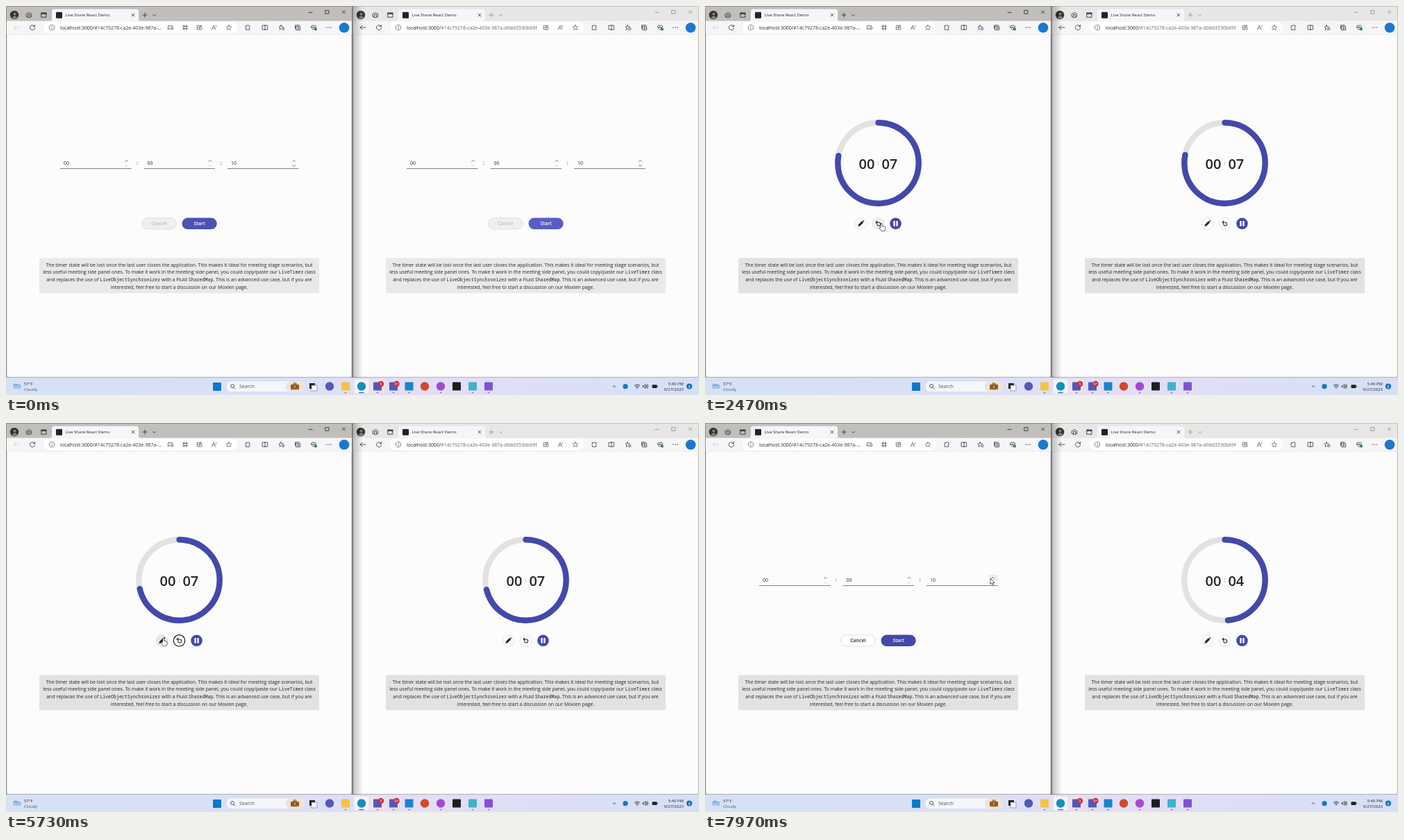
An HTML page that plays this animation: 998 px wide and 561 px high, repeating every 8000 ms.

```html
<!DOCTYPE html>
<html lang="en">
<head>
<meta charset="utf-8">
<title>Shared timer</title>
<style>
  html, body { margin: 0; width: 100%; height: 100%; overflow: hidden; }
  svg { display: block; width: 100vw; height: 100vh; }
  text { font: 6.95px "Open Sans", "Noto Sans", sans-serif; fill: #242424; white-space: pre; }
  .mono { font: 6.6px "Noto Sans Mono", "DejaVu Sans Mono", monospace; }
  .mid { text-anchor: middle; }
  .end { text-anchor: end; }
  .small { font-size: 6px; }
  .semi { font-weight: 600; }
  .digits { font-size: 20px; font-weight: 600; }
  .icon { fill: none; stroke-width: .8; stroke-linecap: round; stroke-linejoin: round; }
</style>
</head>
<body>
<svg id="stage" viewBox="0 0 998 561" preserveAspectRatio="none"></svg>
<script>
const LOOP = 8000;
const BRAND = '#4448aa';
const PANE = 499;
const stage = document.getElementById('stage');

const ICONS = {
  back: 'M4 0H-4M-1 -3L-4 0L-1 3',
  reload: 'M3.2 -1.6A3.6 3.6 0 1 0 3.6 .6M3.5 -3.6V-1.4H1.3',
  info: 'M-3.7 0a3.7 3.7 0 1 0 7.4 0a3.7 3.7 0 1 0 -7.4 0M0 -.4V1.8M0 -1.8V-1.7',
  device: 'M-3.5 1.8V-2.5H3M-4 2H0M1.2 -.5H3.6V2.4H1.2Z',
  shot: 'M-3.5 -1.7H3.5M-3.5 1.7H3.5M-1.8 -3.5V3.5M1.8 -3.5V3.5',
  apps: 'M-3.3 -3H-.3V3H-3.3ZM-3.3 0H3V3H-.3M1.6 -3.6V-.8M.2 -2.2H3',
  read: 'M-3.7 3L-1 -3.2L1.7 3M-2.8 1H.8M2.2 -3.4Q3.8 -2.6 2.4 -.8',
  star: 'M0 -3.7L1.1 -1.3L3.7 -1L1.8 .8L2.3 3.4L0 2.1L-2.3 3.4L-1.8 .8L-3.7 -1L-1.1 -1.3Z',
  puzzle: 'M-2.6 -2.6H-.7A1.2 1.2 0 0 1 1.6 -2.6H3V-.9A1.2 1.2 0 0 0 3 1.4V3.2H-2.6V1.2A1.2 1.2 0 0 1 -2.6 -1Z',
  split: 'M-3.6 -3H3.6V3H-3.6ZM0 -3.7V3.7',
  favs: 'M-1 -3.4L0 -1.2L2.6 -.9M-1 -3.4L-2 -1.2L-4 -.9L-2.4 .8L-2.8 3.2L-1 2M.4 1H4M.4 3H4',
  stack: 'M-2 -1.7H3.6V3.5H-2ZM-3.5 1.5V-3.3H2M.8 -.4V2.2M-.5 .9H2.1',
  heart: 'M-3.5 -.8A2 2 0 0 1 0 -2.4A2 2 0 0 1 3.5 -.8Q2.6 1.6 0 3.4Q-2.8 1.4 -3.5 -.8ZM-2.5 0H-.8L0 -1.2L.8 .8L2.4 0',
  spaces: 'M-3.6 -1.6L0 -3.6L3.6 -1.6V2.4L0 3.8L-3.6 2.4ZM-1.5 -.6H1.7V3M-1.5 -.6V3',
  tabs: 'M-3.4 -3.2H3.4V3.2H-3.4ZM-3.4 -1.6H3.4M-3.4 -2.4H3.4',
  plus: 'M-3 0H3M0 -3V3',
  cross: 'M-2 -2L2 2M2 -2L-2 2',
  down: 'M-2 -1L0 1L2 -1',
  up: 'M-2 1L0 -1L2 1',
  minimise: 'M-2.6 0H2.6',
  maximise: 'M-2.4 -2.4H2.4V2.4H-2.4Z',
  lens: 'M-3 -.7a2.5 2.5 0 1 0 5 0a2.5 2.5 0 1 0 -5 0M1.2 1.2L3.4 3.4',
  undo: 'M-1.8 -3.7L-3.6 -1.8L-1.6 -.1M-3.4 -1.8H.5A2.5 2.5 0 1 1 -2 1',
  wifi: 'M-3.7 -1.2Q0 -4.2 3.7 -1.2M-2.4 .3Q0 -1.6 2.4 .3M-1.1 1.7Q0 .8 1.1 1.7M0 2.8V2.9',
  sound: 'M-3.5 -1H-2L0 -3V3L-2 1H-3.5ZM1.4 -1.5Q2.4 0 1.4 1.5M2.8 -2.7Q4.4 0 2.8 2.7',
};

const icon = (name, x, y, color = '#303030', extra = '') =>
  `<path class="icon" d="${ICONS[name]}" transform="translate(${x} ${y})" stroke="${color}" ${extra}/>`;
const rect = (x, y, w, h, fill, r = 0, extra = '') =>
  `<rect x="${x}" y="${y}" width="${w}" height="${h}" rx="${r}" fill="${fill}" ${extra}/>`;
const disc = (x, y, r, fill, extra = '') => `<circle cx="${x}" cy="${y}" r="${r}" fill="${fill}" ${extra}/>`;
const text = (x, y, str, cls = '', extra = '') => `<text x="${x}" y="${y}" class="${cls}" ${extra}>${str}</text>`;
const mono = str => `<tspan class="mono">${str}</tspan>`;

const NOTE = [
  'The timer state will be lost once the last user closes the application. This makes it ideal for meeting stage scenarios, but',
  `less useful meeting side panel ones. To make it work in the meeting side panel, you could copy/paste our ${mono('LiveTimer')} class`,
  `and replaces the use of ${mono('LiveObjectSynchronizer')} with a Fluid ${mono('SharedMap')}. This is an advanced use case, but if you are`,
  'interested, feel free to start a discussion on our Moxlen page.',
];

function chrome(active) {
  const ink = active ? '#252525' : '#8c8a8c';
  const url = active ? '#14c79278-ca2e-403e-987a-...' : '#14c79278-ca2e-403e-987a-d0dd3530b69f';
  const tools = { apps: 279, read: 300, star: 321, puzzle: 348, split: 373, favs: 397, stack: 420, heart: 443 };
  return rect(0, 0, PANE, 536, active ? '#c1bebb' : '#e8e6e6')
    + rect(1, 21.5, 497, 20, '#f6f5f8')
    + `<path d="M63 22Q66 22 66 19V8Q66 4.500 69.500 4.500H187.500Q191 4.500 191 8V19Q191 22 194 22Z" fill="#f6f5f9"/>`
    + disc(12, 13, 6.2, '#35322f') + disc(12.5, 11.5, 2, '#8b8178')
    + `<path d="M8.500 17.300Q12.500 11.500 16.200 16.700Q12.500 20.500 8.500 17.300Z" fill="#8b8178"/>`
    + icon('spaces', 33, 13) + icon('tabs', 54.5, 13, '#222')
    + rect(72, 8.7, 9, 9, '#20232a', 1)
    + text(85.5, 15.3, 'Live Share React Demo', 'small')
    + icon('cross', 183, 13) + icon('plus', 200, 13, ink) + icon('down', 213.5, 13.5, ink)
    + icon('minimise', 438.5, 9.3, ink) + icon('maximise', 462.5, 8.8, ink) + icon('cross', 486.5, 8.8, ink)
    + icon('back', 15, 31, active ? '#cccbd0' : '#303030') + icon('reload', 38, 31)
    + rect(54, 23, 279, 16, '#fff', 8) + icon('info', 66, 31, '#666')
    + text(78, 33.6, `localhost:3000/<tspan fill="${active ? '#333' : '#666'}">${url}</tspan>`)
    + (active ? icon('device', 237, 31, '#555') + icon('shot', 258, 31, '#444') : '')
    + Object.entries(tools).map(([name, x]) => icon(name, x, 31, x < 330 ? '#666' : '#333')).join('')
    + disc(446, 33.5, 2, '#2f8a45')
    + [462, 465, 468].map(x => disc(x, 31, .7, '#333')).join('')
    + disc(487, 31.3, 7.3, '#1b78d0')
    + rect(1.5, 41, 496, 494, '#fcfcfd', 3, 'stroke="#dddce0" stroke-width=".5"')
    + `<path d="M.5 536V.5H498.500V536" fill="none" stroke="${active ? '#85827f' : '#bbb8b8'}" stroke-width=".8"/>`
    + `<path d="M0 535.500H499" stroke="#aaa9b0" stroke-width=".8"/>`;
}

function field(x, value, enabled) {
  return text(x + 5, 229, value)
    + icon('up', x + 95.5, 223.3, '#555')
    + icon('down', x + 95.5, 230.3, enabled ? '#555' : '#ccc')
    + `<path d="M${x} 234.500H${x + 102.500}" stroke="#616161" stroke-width=".8"/>`;
}

function pane(id) {
  const ringAttrs = 'cx="249.5" cy="226.5" r="58.2" fill="none" stroke-width="8.4"';
  const edge = 'stroke="#cfcfcf" stroke-width=".6"';
  return `<g id="${id}edit">`
    + rect(409.5, 219, 12, 8, '#e9e9ee', 1, `id="${id}spin"`)
    + field(78, '00') + field(198.5, '00') + field(319, '10', true)
    + text(189, 229, ':', 'mid semi') + text(309.7, 229, ':', 'mid semi')
    + rect(195.5, 305.7, 49.8, 16.2, '#f0f0f0', 8.1, `id="${id}cancel" ${edge}`)
    + text(220.3, 316.3, 'Cancel', 'mid semi', `id="${id}cancelText"`)
    + rect(253.5, 305.5, 50.2, 16.6, BRAND, 8.3, `id="${id}start"`)
    + text(278.6, 316.3, 'Start', 'mid semi', 'style="fill:#fff"')
    + `</g><g id="${id}timer">`
    + `<circle ${ringAttrs} stroke="#e2e2e3"/>`
    + `<circle id="${id}ring" ${ringAttrs} stroke="${BRAND}" stroke-linecap="round" pathLength="1" transform="rotate(-90 249.5 226.5)"/>`
    + text(233, 234.6, '00', 'digits mid') + text(249.6, 229.2, ':', 'mid')
    + text(265.8, 234.6, '', 'digits mid', `id="${id}secs"`)
    + disc(224.5, 313.8, 8.2, '#fff', `id="${id}pen" ${edge}`)
    + `<path d="M220.300 318L221.200 314.900L226 310.100L228.200 312.300L223.400 317.100ZM226.700 309.500Q228.200 308.600 229 309.700Q229.500 310.700 228.800 311.600Z" fill="#222"/>`
    + disc(249.5, 313.8, 8.2, '#fff', `id="${id}reset" ${edge}`)
    + icon('undo', 249.7, 313.8, '#222', 'style="stroke-width:1.1"')
    + disc(274.5, 313.8, 8.3, BRAND)
    + rect(271.3, 310, 2.4, 7.6, '#fff', .6) + rect(275.3, 310, 2.4, 7.6, '#fff', .6)
    + '</g>'
    + rect(48, 363.5, 403, 50.8, '#e2e2e1', 2, `id="${id}note"`)
    + NOTE.map((line, i) => text(249.5, 375.6 + i * 10.77, line, 'mid')).join('');
}

function taskbar() {
  // x, shape, colour, running
  const apps = [
    [466, 'o', '#5558b8'], [489, 's', '#f3c443', 1], [512, 'o', '#168ebd', 1], [535, 's', '#5158bd', 1],
    [558, 's', '#5158bd', 1], [580.5, 's', '#1c83d0', 1], [603, 'o', '#cf4a2b'], [626, 'o', '#a648d4', 1],
    [649, 's', '#1e1e1e'], [672, 's', '#42b0cf', 1], [695, 's', '#8250d6', 1],
  ];
  const badge = (x, label) => disc(x, 545, 4.2, '#c9303f')
    + text(x, 547, label, 'mid', 'style="font-size:5.2px;fill:#fff"');
  return rect(0, 536, 998, 25, 'url(#bar)')
    + disc(14, 548, 3.6, '#86a9dc') + disc(18.5, 548.8, 3, '#86a9dc') + rect(10, 547.5, 12, 4.4, '#a9c3ea', 2.2)
    + text(26, 547.2, '57°F', 'small') + text(26, 554.8, 'Cloudy', 'small', 'style="fill:#555"')
    + rect(298, 543, 12, 12, '#0b78c8', 1)
    + rect(317, 541, 113, 15.5, '#f4f6fc', 7.7, 'stroke="#d6d9e6" stroke-width=".5"')
    + rect(403, 541.5, 26.5, 14.5, '#eee4d5', 7)
    + icon('lens', 326.5, 548.7, '#333') + text(336, 551.2, 'Search', '', 'style="fill:#555"')
    + rect(410, 545.8, 12, 7.5, '#9b622a', 1) + rect(414, 543.9, 4, 2, 'none', .5, 'stroke="#6b421d"')
    + rect(410, 548.6, 12, 1, '#6b421d') + rect(415, 548, 2, 2.2, '#e9b54a')
    + rect(437, 544, 8, 8, '#222') + rect(440, 547, 8, 8, '#f4f4f4', 0, 'stroke="#777" stroke-width=".6"')
    + rect(501.5, 538.5, 21, 20, '#f3f4fb', 2) + rect(524.5, 538.5, 21, 20, '#f4dfe8', 2)
    + apps.map(([x, shape, color, running]) =>
        (shape === 'o' ? disc(x, 548.5, 6.2, color) : rect(x - 6, 542.5, 12, 12, color, 1))
        + (running ? rect(x - (x === 512 ? 4 : 1.5), 557, x === 512 ? 8 : 3, 1.2, x === 512 ? '#1775c0' : '#777', .6) : '')
      ).join('')
    + badge(540, '5') + badge(562.5, '9+')
    + icon('up', 876, 548.7) + disc(892, 548.7, 3.6, '#1478c8')
    + icon('wifi', 909, 548.5, '#222') + icon('sound', 921, 548.5, '#222')
    + rect(930.5, 546.3, 7, 4.6, '#222', 1) + rect(937.5, 547.6, 1, 2, '#222')
    + text(976, 547.2, '5:40 PM', 'small end') + text(976, 554.8, '9/27/2023', 'small end')
    + disc(984, 548.5, 4.1, '#1470bd') + text(984, 550.5, '8', 'mid', 'style="font-size:5.4px;fill:#fff"');
}

stage.innerHTML = `<defs>
    <linearGradient id="bar"><stop offset="0" stop-color="#d5e2f4"/><stop offset=".35" stop-color="#d9e0f7"/>
      <stop offset=".6" stop-color="#e3def4"/><stop offset="1" stop-color="#d6e0f5"/></linearGradient>
    <linearGradient id="shade"><stop offset="0" stop-color="#000" stop-opacity=".24"/>
      <stop offset="1" stop-color="#000" stop-opacity="0"/></linearGradient>
  </defs>
  <g>${chrome(true)}${pane('a')}</g>
  <g transform="translate(${PANE})">${chrome(false)}${pane('b')}</g>
  ${rect(499, 0, 15, 536, 'url(#shade)')}${rect(498, 0, 1.4, 536, '#77757a')}
  ${taskbar()}
  <g id="cursor" stroke="#222" stroke-width=".7" stroke-linejoin="round" fill="#fff">
    <path id="arrow" d="M0 0V8.600L2 6.800L3.300 9.700L4.700 9.100L3.400 6.200H6Z"/>
    <path id="hand" d="M-1 .9Q0 -.6 1 .9V4.300Q2 3.600 2.700 4.600Q3.700 4 4.300 5Q5.700 4.600 5.700 6.200V8.500Q5.600 11.500 3 11.700H1.200Q-.4 11.600 -1.500 9.600L-3.200 7Q-3.200 5.600 -1.800 6.200L-1 7Z"/>
  </g>`;

const el = id => document.getElementById(id);
const show = (id, on) => el(id).setAttribute('visibility', on ? 'visible' : 'hidden');
const paint = (id, attrs) => Object.entries(attrs).forEach(([k, v]) => el(id).setAttribute(k, v));

const RESET = 2870;
const EDIT = 6950;
const PANES = {
  a: { starts: [260, 2885], editAgain: EDIT },
  b: { starts: [300, 2850], editAgain: Infinity },
};
// time, x, y of the pointer tip
const POINTER = [
  [0, 284, 313], [650, 284, 313], [1050, 330, 304], [1600, 330, 304], [2150, 254, 313], [3300, 254, 313],
  [3900, 231.5, 310], [4500, 231.5, 310], [4800, 226.5, 310], [7050, 226.5, 310], [7650, 411, 224], [8000, 411, 224],
];

function pointerAt(t) {
  const i = POINTER.findIndex(key => key[0] > t);
  const [t0, x0, y0] = POINTER[i - 1], [t1, x1, y1] = POINTER[i];
  const p = (t - t0) / (t1 - t0), e = p * p * (3 - 2 * p);
  return [x0 + (x1 - x0) * e, y0 + (y1 - y0) * e];
}

function drawPane(id, t, px, py) {
  const { starts, editAgain } = PANES[id];
  const first = t < starts[0];
  const editing = first || t >= editAgain;
  const over = x => id === 'a' && Math.hypot(px - x, py - 313.8) < 7.6;
  show(id + 'edit', editing);
  show(id + 'timer', !editing);
  el(id + 'spin').style.opacity = id === 'a' && px > 409 && py < 227 ? 1 : 0;
  paint(id + 'cancel', { fill: first ? '#efefef' : '#fff' });
  el(id + 'cancelText').style.fill = first ? '#bdbdbd' : '#242424';
  paint(id + 'start', { fill: first ? (id === 'a' ? '#4e51b1' : '#595dc5') : BRAND });
  paint(id + 'note', { fill: t < 30 ? '#e9e9e8' : '#e2e2e1' });

  const start = t >= starts[1] ? starts[1] : starts[0];
  const left = Math.max(0, Math.min(10, 10 - (t - start) / 1000));
  paint(id + 'ring', { 'stroke-dasharray': `${left / 10} 2` });
  el(id + 'secs').textContent = String(Math.floor(left)).padStart(2, '0');
  const focused = id === 'a' && t >= RESET;
  paint(id + 'pen', { fill: over(224.5) ? '#e6e6e6' : '#fff' });
  paint(id + 'reset', {
    fill: over(249.5) ? '#f1f1f1' : '#fff',
    stroke: focused ? '#111' : '#cfcfcf',
    'stroke-width': focused ? 1.2 : .6,
  });
}

function draw(t) {
  const [x, y] = pointerAt(t);
  drawPane('a', t, x, y);
  drawPane('b', t, x, y);
  const hand = y > 305 && x < 304;
  paint('cursor', { transform: `translate(${x} ${y})` });
  show('arrow', t >= 30 && !hand);
  show('hand', t >= 30 && hand);
}

const began = performance.now();
function tick() {
  draw((performance.now() - began) % LOOP);
  requestAnimationFrame(tick);
}
tick();
</script>
</body>
</html>
```
